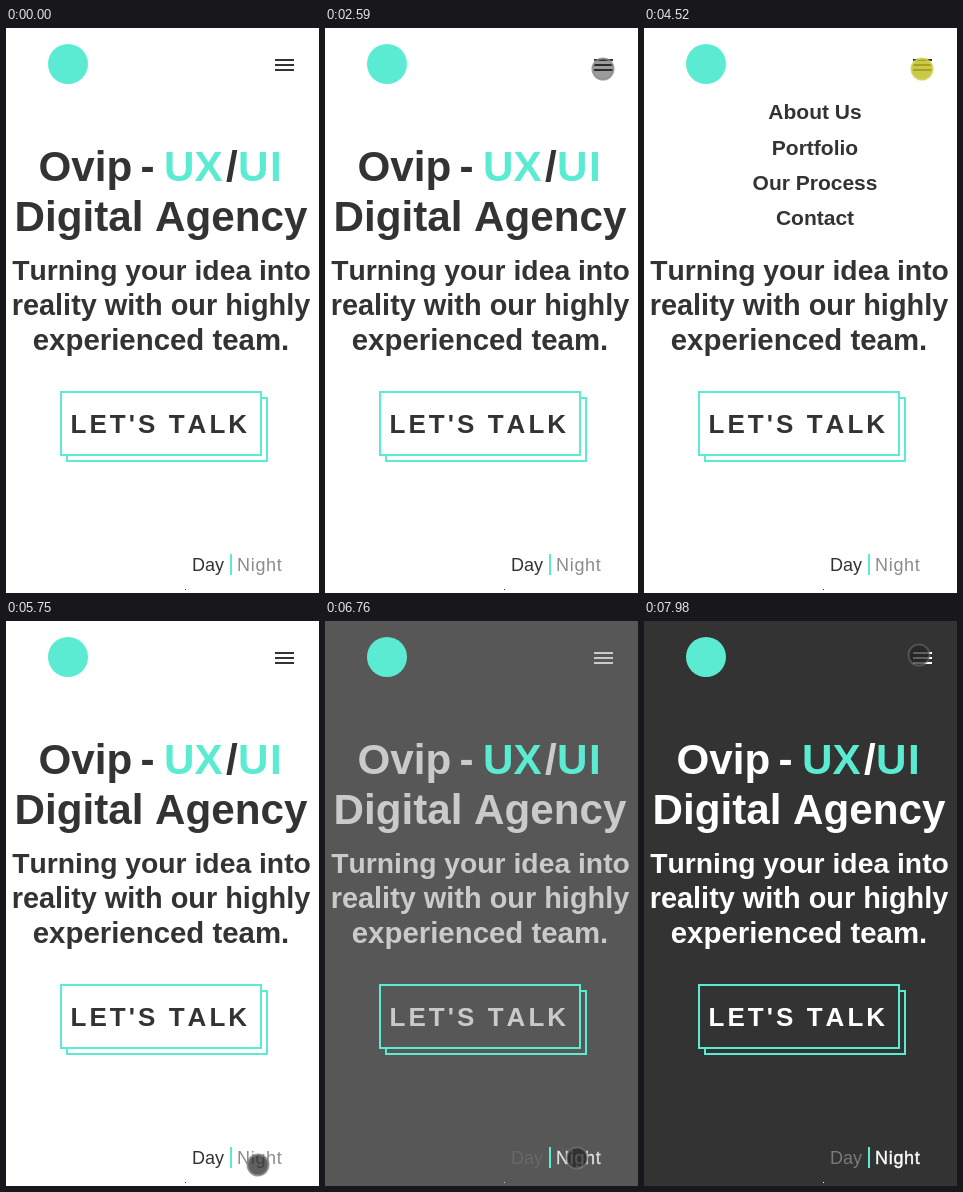
These frames come from a looping animation (313 by 565 pixels, 8 s). An HTML page:

```html
<!DOCTYPE html>
<html lang="en">
<head>
<meta charset="utf-8">
<title>Agency landing page</title>
<style>
  html, body { margin: 0; width: 100%; height: 100%; overflow: hidden; background: #fff; }
  svg {
    --bg: #fff; --fg: #333; --day: #333; --night: #8c8c8c; --mint: #5bebd3;
    display: block; width: 100%; height: 100%; background: var(--bg);
    font-family: "Liberation Sans", Arial, sans-serif; font-kerning: none;
  }
  text { fill: var(--fg); font-weight: 700; white-space: pre; }
  .title { font-size: 42.2px; }
  .mint { fill: var(--mint); }
  .mid { text-anchor: middle; }
  .box { fill: var(--bg); stroke: var(--mint); stroke-width: 2; }
  .cta { font-size: 26px; letter-spacing: 3.05px; }
  .mode text { font-size: 18px; font-weight: 400; }
  .mode .day { fill: var(--day); }
  .mode .night { fill: var(--night); stroke: var(--night); letter-spacing: .7px; }
  .bars { stroke: var(--fg); stroke-width: 2; }
  .menu text { font-size: 21px; fill: #333; }
</style>
</head>
<body>
<svg id="stage" viewBox="0 0 313 565" preserveAspectRatio="none">
  <circle class="mint" cx="62" cy="36" r="20"/>
  <path class="bars" d="M269 32h19M269 37h19M269 42h19"/>

  <g class="title">
    <text x="32.5" y="153">Ovip</text>
    <text x="134.5" y="153">-</text>
    <text class="mint" x="158" y="153">UX</text>
    <text x="220" y="153">/</text>
    <text class="mint" x="232" y="153" letter-spacing="1.5">UI</text>
    <text class="mid" x="155" y="203">Digital Agency</text>
  </g>

  <text class="mid" x="155.5" y="252" font-size="28.3">Turning your idea into</text>
  <text class="mid" x="155" y="287" font-size="28.9">reality with our highly</text>
  <text class="mid" x="155" y="322" font-size="29.4">experienced team.</text>

  <rect class="box" x="61" y="370" width="200" height="63"/>
  <rect class="box" x="55" y="364" width="200" height="63"/>
  <text class="cta" x="64.5" y="405">LET'S TALK</text>

  <g class="mode">
    <text class="day" x="186" y="543">Day</text>
    <rect class="mint" x="224" y="526" width="2" height="21"/>
    <text class="night" id="night" x="231" y="543">Night</text>
  </g>
  <rect x="179" y="561" width="1" height="1" fill="var(--fg)"/>

  <g class="menu mid" id="menu">
    <rect y="64" width="313" height="150" fill="#fff"/>
    <text x="171" y="91">About Us</text>
    <text x="171" y="127">Portfolio</text>
    <text x="171" y="162">Our Process</text>
    <text x="171" y="197">Contact</text>
  </g>

  <circle id="ring" fill="none" stroke="#d6d53c" stroke-width="2"/>
  <circle id="dot" r="10.5" stroke-width="2"/>
</svg>
<script>
const LOOP = 8000;
const $ = id => document.getElementById(id);
const [stage, menu, night, ring, dot] = ['stage', 'menu', 'night', 'ring', 'dot'].map($);

// start, end, from x/y, bend x/y, to x/y
const moves = [
  [650, 1060, 265, 509, 238, 450, 213, 393],
  [1650, 2390, 213, 393, 190, 240, 274, 54],
  [2400, 2590, 274, 54, 277, 46, 278, 41],
  [4880, 5750, 278, 40, 262, 290, 252, 544],
  [5990, 6080, 252, 544, 252, 540, 252, 537],
  [7060, 7840, 252, 536, 340, 250, 271, 35],
  [7880, 7980, 271, 35, 273, 34, 275, 34]
];
const clicks = [2850, 4520, 6340];

const ramp = (t, a, b) => Math.min(1, Math.max(0, (t - a) / (b - a)));
const smooth = p => p * p * (3 - 2 * p);
const lerp = (a, b, p) => a + (b - a) * p;
const grey = (a, b, p) => {
  const v = Math.round(lerp(a, b, p));
  return `rgb(${v},${v},${v})`;
};
const set = (el, attrs) => {
  for (const k in attrs) el.setAttribute(k, attrs[k]);
};

function pointer(t) {
  const m = moves.filter(m => t >= m[0]).pop() || moves[0];
  const [a, b, x0, y0, cx, cy, x1, y1] = m;
  const s = smooth(ramp(t, a, b)), r = 1 - s;
  return {
    cx: r * r * x0 + 2 * r * s * cx + s * s * x1,
    cy: r * r * y0 + 2 * r * s * cy + s * s * y1
  };
}

function render(t) {
  const back = ramp(t, 6555, 6805), ink = ramp(t, 6565, 6830);
  const vars = {
    bg: grey(255, 51, back),
    fg: grey(51, 255, ink),
    day: grey(51, 122, ink),
    night: grey(140, 255, ink)
  };
  for (const k in vars) stage.style.setProperty('--' + k, vars[k]);
  night.style.strokeWidth = 0.4 * ink;

  menu.style.opacity = ramp(t, 2990, 3260) - ramp(t, 4640, 4900);

  const pos = pointer(t);
  const since = t - (clicks.filter(c => t >= c).pop() ?? -LOOP);
  const pressed = since < 210;
  set(dot, {
    ...pos,
    fill: pressed ? '#bdbc1e' : '#222',
    stroke: pressed ? '#d0cf50' : '#888',
    'fill-opacity': pressed ? 0.82 : lerp(0.45, 0.72, ramp(t, 4900, 5300)),
    'stroke-opacity': lerp(0.8, 0.4, back),
    opacity: ramp(t, 640, 700)
  });

  const p = ramp(since, 110, 270);
  set(ring, { ...pos, r: lerp(11, 24, p), opacity: p > 0 && p < 1 ? 0.8 * (1 - p) : 0 });
}

const begin = performance.now();
function tick() {
  render((performance.now() - begin) % LOOP);
  requestAnimationFrame(tick);
}
tick();
</script>
</body>
</html>
```
